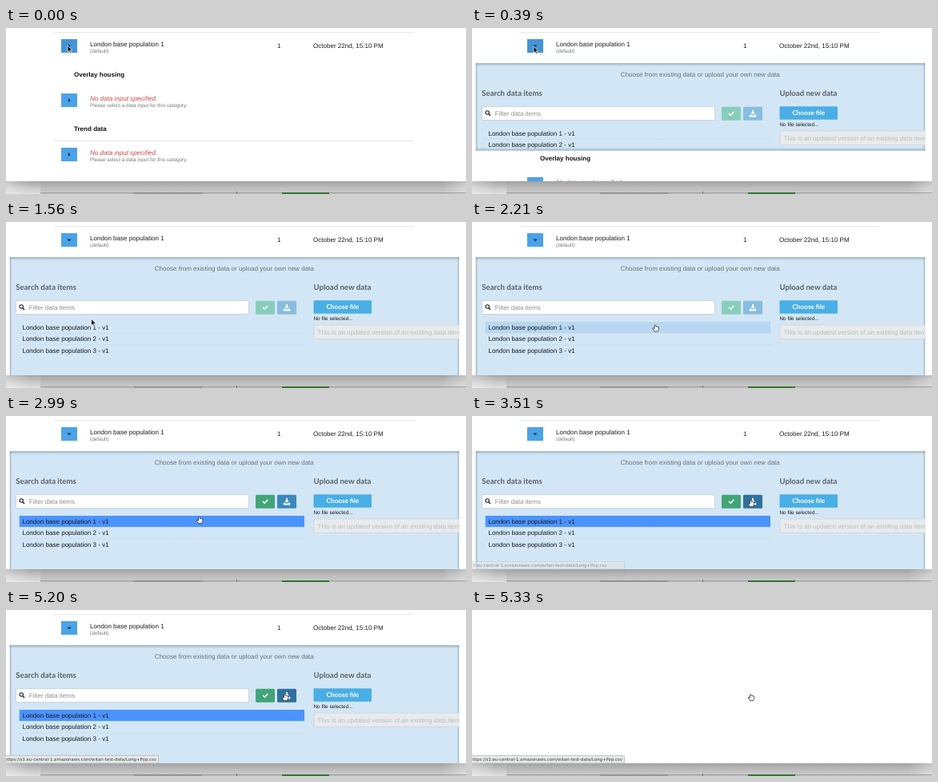
Write an HTML page with a canvas that moves like this. It is 575 px wide and 208 px high and loops after 5460 ms.

```html
<!DOCTYPE html>
<html lang="en">
<head>
<meta charset="utf-8">
<title>Choosing a data input</title>
<style>
html, body { margin: 0; width: 100%; height: 100%; overflow: hidden; background: #fff; }
canvas { display: block; }
</style>
</head>
<body>
<canvas id="stage" width="575" height="208"></canvas>
<script>
const ctx = document.getElementById('stage').getContext('2d');
ctx.textRendering = 'geometricPrecision';

const LOOP = 5460, STEP = 130;
const SANS = '"Liberation Sans", Arial, sans-serif';
const HEADING = 'Lato, "Open Sans", sans-serif';
const STATUS = '"DejaVu Sans", sans-serif';
const WINDOW_BOTTOM = 192, PANEL = { left: 4.5, right: 566.5, top: 44, height: 152 };
const POINTER_PATH = [
  [0, 77, 22], [390, 77, 23], [910, 77, 23], [1560, 106.6, 121.4],
  [2210, 229, 129], [2860, 229, 129], [3510, 348.3, 105.5]
];

const clamp = v => Math.max(0, Math.min(1, v));
const progress = (t, from, to) => clamp((t - from) / (to - from));
const smooth = p => p * p * (3 - 2 * p);

function rect(x, y, w, h, fill) {
  ctx.fillStyle = fill;
  ctx.fillRect(x, y, w, h);
}

function box(x, y, w, h, fill, border, radius = 1.5) {
  ctx.beginPath();
  ctx.roundRect(x, y, w, h, radius);
  ctx.fillStyle = fill;
  ctx.fill();
  if (border) {
    ctx.strokeStyle = border;
    ctx.lineWidth = 0.8;
    ctx.stroke();
  }
}

function text(str, x, y, { size = 8.05, style = '', color = '#1a1a1a', family = SANS, align = 'left' } = {}) {
  ctx.font = `${style} ${size}px ${family}`;
  ctx.fillStyle = color;
  ctx.textAlign = align;
  ctx.fillText(str, x, y);
}

function path(points, fill, stroke, width = 0.8, closed = true) {
  ctx.beginPath();
  points.forEach(([x, y]) => ctx.lineTo(x, y));
  if (closed) ctx.closePath();
  if (fill) { ctx.fillStyle = fill; ctx.fill(); }
  if (stroke) {
    ctx.strokeStyle = stroke;
    ctx.lineWidth = width;
    ctx.lineJoin = 'round';
    ctx.stroke();
  }
}

function fade(x0, y0, x1, y1, stops) {
  const g = ctx.createLinearGradient(x0, y0, x1, y1);
  stops.forEach((c, i) => g.addColorStop(i / (stops.length - 1), c));
  return g;
}

function toggle(y, open, hover) {
  rect(69, y, 20, 17, hover ? '#4494d8' : '#4ba3e7');
  const cy = y + 8.5;
  path(open ? [[76.3, cy - 1], [81.7, cy - 1], [79, cy + 1.8]]
            : [[77.8, cy - 2.4], [80.6, cy], [77.8, cy + 2.4]], '#173650');
}

function emptyCategory(title, y) {
  text(title, 85, y, { style: 'bold', color: '#111' });
  toggle(y + 21, false);
  text('No data input specified.', 105, y + 29.7, { style: 'italic', color: '#cf4548' });
  text('Please select a data input for this category.', 105, y + 38.3, { size: 6.4, color: '#777' });
}

function page(t, panelHeight) {
  const open = t >= STEP;
  rect(60, 5, 450, 1, '#e8e8e8');
  toggle(14, open, t < 1170);
  text('London base population 1', 105, 22.8);
  text('(default)', 105, 31.2, { size: 6.4, color: '#777' });
  text('1', 339, 25.2);
  text('October 22nd, 15:10 PM', 384, 25.2);

  const shift = open ? panelHeight - 5 : 0;
  emptyCategory('Overlay housing', 61 + shift);
  emptyCategory('Trend data', 129 + shift);
  rect(60, 141 + shift, 450, 1, '#e8e8e8');
}

function searchIcon() {
  ctx.beginPath();
  ctx.arc(19.2, 106, 2.2, 0, 7);
  ctx.strokeStyle = '#222';
  ctx.lineWidth = 1.1;
  ctx.stroke();
  path([[20.8, 107.7], [23, 110]], null, '#222', 1.3, false);
}

function actionButtons(enabled, hover) {
  const mix = (off, on) => enabled > 0.9 ? on : enabled > 0 ? off[1] : off[0];
  box(312, 98.7, 24, 17, mix(['#88cdbb', '#66bd9d'], '#41a578'));
  box(339, 98.7, 24, 17, hover ? '#2f719f' : mix(['#88bddf', '#62a4ce'], '#3a88bc'));
  path([[321, 107], [323.3, 109.3], [327.2, 104.9]], null, '#fff', 1.5, false);
  rect(350.1, 102.8, 1.8, 3.6, '#fff');
  path([[348.2, 105.9], [353.8, 105.9], [351, 108.8]], '#fff');
  path([[346.8, 108.8], [349.3, 108.8], [351, 110.2], [352.7, 108.8], [355.2, 108.8],
    [355.2, 111.5], [346.8, 111.5]], '#fff');
}

function listItems(t) {
  const hover = t >= 1820, selected = t >= 2340;
  if (hover) rect(16.7, 125, 356.3, 14, selected ? '#4c93fd' : '#b9d7f2');
  ctx.setLineDash([1, 1]);
  [139.4, 153.9].forEach(y => path([[16, y], [374, y]], null, '#b4c8d6', 0.6, false));
  ctx.setLineDash([]);
  for (let i = 0; i < 3; i++)
    text(`London base population ${i + 1} - v1`, 20.4, 134.6 + i * 14.6, { color: '#161c20' });
}

function panelShadow(bottom) {
  const { left, right, top } = PANEL;
  const dark = 'rgba(75,105,125,.42)', clear = 'rgba(75,105,125,0)';
  const w = right - left, h = bottom - top;
  rect(left, top, w, 4, fade(0, top, 0, top + 4, [dark, clear]));
  rect(left, bottom - 4, w, 4, fade(0, bottom, 0, bottom - 4, [dark, clear]));
  rect(left, top, 3, h, fade(left, 0, left + 3, 0, [dark, clear]));
  rect(right - 3, top, 3, h, fade(right, 0, right - 3, 0, [dark, clear]));
}

function panel(t, height) {
  const { left, right, top } = PANEL;
  ctx.save();
  ctx.beginPath();
  ctx.rect(left, top, right - left, height);
  ctx.clip();
  rect(left, top, right - left, height, '#d2e6f5');
  panelShadow(top + height);

  text('Choose from existing data or upload your own new data', 285.3, 60.6, { color: '#6c7174', align: 'center' });
  const heading = { size: 9.6, style: 'bold', family: HEADING, color: '#5a6166' };
  text('Search data items', 12.3, 85.4, heading);
  text('Upload new data', 384.5, 85.4, heading);

  box(12.5, 98.4, 291, 17.2, '#fff', '#c3cdd4');
  searchIcon();
  text('Filter data items', 28.7, 109.6, { color: '#8c8c8c' });
  actionButtons(progress(t, 2210, 2470), t >= 3510);
  listItems(t);

  box(384.5, 98.3, 72.5, 16.4, '#4aaee6', null, 1);
  text('Choose file', 420.8, 109.2, { size: 8.2, style: 'bold', family: HEADING, color: '#fff', align: 'center' });
  text('No file selected...', 384.5, 123, { size: 6.4 });
  box(385, 129, 190, 17.5, '#e8eaeb', '#d0d5d8');
  text('This is an updated version of an existing data item', 389.6, 140.8, { size: 8, color: '#b9bdbf' });
  ctx.restore();
}

function backdrop() {
  const y = WINDOW_BOTTOM, h = 16;
  rect(0, y, 575, h, fade(0, y, 0, y + h, ['#a2a2a2', '#bcbcbc', '#cdcdcd']));
  rect(0, y, 43, h, fade(0, y, 0, y + h, ['#a6a6a6', '#c6c6c6', '#e0e0e0']));
  rect(0, y, 30, h, fade(0, 0, 30, 0, ['rgba(255,255,255,.35)', 'rgba(255,255,255,0)']));
  rect(545, y, 30, h, fade(545, 0, 575, 0, ['rgba(255,255,255,0)', 'rgba(255,255,255,.35)']));
  rect(43, 206.3, 532, 0.9, '#8d8d8d');
  rect(160, 206.5, 85, 1, '#7a7a7a');
  rect(288, 205, 1, 3, '#777');
  rect(345, 206, 59, 2, '#33752f');
}

function statusBubble(t) {
  const shift = 19.5 * (progress(t, 4940, 5200) - 1);
  ctx.globalAlpha = progress(t, 3380, 3640);
  box(-4, 182.3, 194.5, 9.7, '#e6e8e8', '#b5b9bb', 1);
  text('https://s3.eu-central-1.amazonaws.com/witan-test-data/Long+Pop.csv', 188 + shift, 189.2,
    { size: 5.4, family: STATUS, color: '#3c3c3c', align: 'right' });
  ctx.globalAlpha = 1;
}

function pointerAt(t) {
  const next = POINTER_PATH.findIndex(k => k[0] > t);
  if (next < 0) return POINTER_PATH.at(-1).slice(1);
  const [t0, x0, y0] = POINTER_PATH[next - 1], [t1, x1, y1] = POINTER_PATH[next];
  const p = smooth(progress(t, t0, t1));
  return [x0 + (x1 - x0) * p, y0 + (y1 - y0) * p];
}

function pointer(t) {
  const arrow = [[0, 0], [0, 8.2], [1.9, 6.5], [3.2, 9.3], [4.5, 8.7], [3.3, 6], [5.9, 5.8]];
  const hand = [[-0.9, 0.6], [0, 0.1], [0.8, 0.8], [1, 2], [3, 2], [4.4, 2.8], [4.4, 5.2],
    [3.4, 7.2], [3, 8.2], [-0.8, 8.2], [-1.8, 6.6], [-3.2, 4.4], [-2.6, 3.6], [-0.9, 4.6]];
  ctx.save();
  ctx.translate(...pointerAt(t));
  if (t < 1820) path(arrow, '#111', '#fff', 0.7);
  else path(hand, '#fff', '#222', 0.8);
  ctx.restore();
}

function draw(t) {
  const visible = t < 5330;
  const height = PANEL.height * Math.sin(Math.PI / 2 * progress(t, 65, 697));
  rect(0, 0, 575, 208, '#fff');
  if (visible) {
    page(t, height);
    if (t >= STEP) panel(t, height);
  }
  backdrop();
  statusBubble(t);
  pointer(t);
}

function tick() {
  const t = performance.now() % LOOP;
  draw(Math.floor(t / STEP) * STEP);
  requestAnimationFrame(tick);
}
tick();
</script>
</body>
</html>
```
